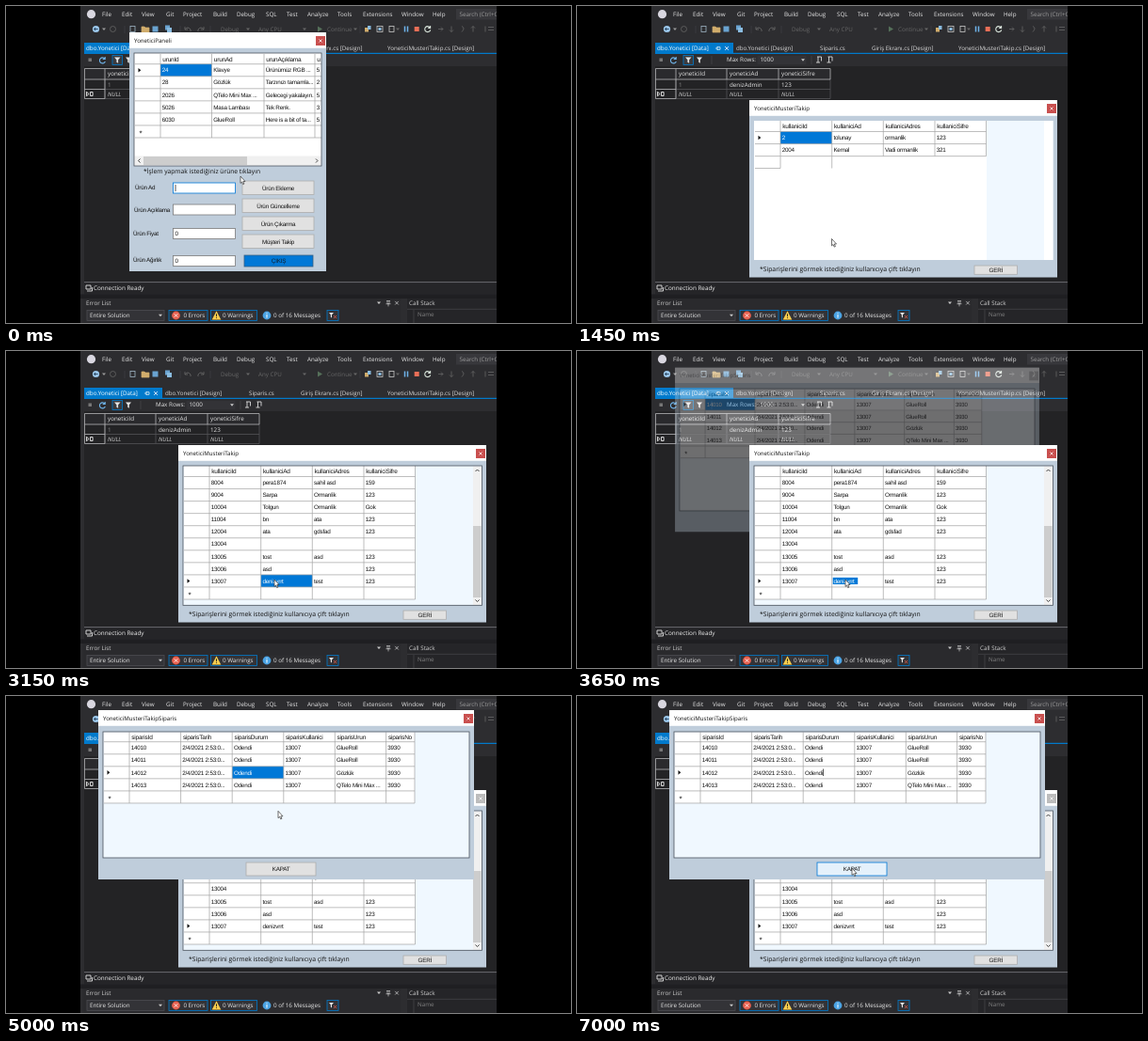
An HTML page that plays this animation: 600x337 px, repeating every 7050 ms.

```html
<!DOCTYPE html>
<html lang="tr">
<head>
<meta charset="utf-8">
<title>Yönetici paneli</title>
<style>
html, body { margin: 0; width: 100%; height: 100%; overflow: hidden; background: #000; }
svg { display: block; width: 100vw; height: 100vh; text-rendering: geometricPrecision; }
text { white-space: pre; }
.ui { font-family: "Open Sans", "Noto Sans", sans-serif; }
.form { font-family: "Liberation Sans", Arial, sans-serif; letter-spacing: -.22px; }
</style>
</head>
<body>
<svg viewBox="0 0 600 337">
  <defs>
    <clipPath id="ide"><rect x="79" width="442" height="337"/></clipPath>
    <clipPath id="panelGrid"><rect x="136" y="50" width="199" height="120"/></clipPath>
    <clipPath id="takipGrid"><rect x="188" y="122" width="317" height="148"/></clipPath>
  </defs>
  <g id="back" clip-path="url(#ide)"></g>
  <g id="wins">
    <g id="panel"></g>
    <g id="siparis"></g>
    <g id="takip"></g>
  </g>
  <path id="cursor" d="M0 0V7.4L1.6 6 2.7 8.6 3.9 8.1 2.8 5.5H5Z" fill="#fff" stroke="#333" stroke-width=".7"/>
</svg>
<script>
const LOOP = 7050;
const BLUE = '#0078d7', BODY = '#bfcddb', AZURE = '#f0f8ff', LINE = '#a3a3a3', EDGE = '#4a525c';
const $ = id => document.getElementById(id);

// Drawing helpers; text is placed by its vertical middle.
const rect = (x, y, w, h, fill, stroke) =>
  `<rect x="${x}" y="${y}" width="${w}" height="${h}" fill="${fill}"` +
  (stroke ? ` stroke="${stroke}" stroke-width=".8"` : '') + '/>';
const path = (d, stroke, w = .7, fill = 'none') =>
  `<path d="${d}" stroke="${stroke}" stroke-width="${w}" fill="${fill}"/>`;
const shape = (d, fill) => `<path d="${d}" fill="${fill}"/>`;
const dot = (x, y, r, fill) => `<circle cx="${x}" cy="${y}" r="${r}" fill="${fill}"/>`;
const text = (cls, x, y, s, fill, size, extra = '') =>
  `<text class="${cls}" x="${x}" y="${y + size * .35}" font-size="${size}" fill="${fill}" ${extra}>${s}</text>`;
const ui = (x, y, s, fill = '#e6e6e6', size = 6.25, extra) => text('ui', x, y, s, fill, size, extra);
const form = (x, y, s, fill = '#111', size = 6.3, extra) => text('form', x, y, s, fill, size, extra);
const cross = (x, y, r, c) => path(`M${x - r} ${y - r}L${x + r} ${y + r}M${x + r} ${y - r}L${x - r} ${y + r}`, c, .8);
const down = (x, y, c = '#999') => shape(`M${x - 2} ${y - 1}h4l-2 2.4z`, c);

function button(b, hot) {
  const [x, y, w, h, label] = b;
  return rect(x, y, w, h, hot ? '#e5f1fb' : '#e1e1e1', hot ? BLUE : '#adadad') +
    form(x + w / 2, y + h / 2 + .2, label, '#111', 6.3, 'text-anchor="middle"');
}

function frame(x, y, w, h, title, active = true) {
  return rect(x, y, w, h, BODY) + rect(x, y, w, 16.8, '#fff') +
    ui(x + 5, y + 8.7, title, active ? '#111' : '#777', 6.15) +
    rect(x + w - 11, y + 4, 10, 10, active ? '#c9504f' : '#bcbcbc') +
    cross(x + w - 6, y + 9, 1.5, '#fff');
}

// Data table: the first column holds the row markers, the last row may be the "new" row.
function table({ xs, y, head, heads, rows, mark, sel, edit }) {
  const pitch = 13.05, left = xs[0], right = xs[xs.length - 1];
  const top = y + head, rowY = r => top + r * pitch, bottom = rowY(rows.length);
  let s = rect(left, y, right - left, bottom - y, '#fff');
  if (sel) {
    const [r, c] = sel;
    s += rect(xs[c + 1], rowY(r), xs[c + 2] - xs[c + 1], pitch, BLUE);
  }
  let d = xs.slice(1).map(x => `M${x} ${y}V${bottom}`).join('');
  for (let r = 0; r <= rows.length; r++) d += `M${left} ${rowY(r)}H${right}`;
  s += path(d, LINE);
  heads.forEach((h, c) => s += form(xs[c + 1] + 2.3, y + head / 2 + .2, h, '#111', 6.5));
  rows.forEach((row, r) => {
    const mid = rowY(r) + pitch / 2;
    if (!row) {
      s += form(left + 4.5, mid + 1.5, '*', '#111', 8);
      return;
    }
    row.forEach((v, c) => {
      const on = sel && sel[0] === r && sel[1] === c;
      const marked = edit && edit[0] === r && edit[1] === c;
      if (marked) s += rect(xs[c + 1] + 1, mid - 3.6, 26.5, 7.2, BLUE);
      s += form(xs[c + 1] + 1.7, mid, v, on || marked ? '#fff' : '#111');
    });
  });
  if (mark >= 0) {
    const m = rowY(mark) + pitch / 2;
    s += shape(`M${left + 3.5} ${m - 2.3}l2.8 2.3l-2.8 2.3z`, '#111');
  }
  return s;
}

function drawBack() {
  const dim = '#666', pale = '#c8c8c8';
  let s = rect(79, 0, 442, 337, '#2d2d30');
  s += dot(90.5, 8.7, 4.6, '#d9d7e0');
  [[102, 'File'], [123, 'Edit'], [144, 'View'], [170, 'Git'], [188, 'Project'], [220, 'Build'], [245, 'Debug'],
   [276, 'SQL'], [298, 'Test'], [320, 'Analyze'], [352, 'Tools'], [379, 'Extensions'], [420, 'Window'], [453, 'Help']]
    .forEach(([x, n]) => s += ui(x, 8.8, n));
  s += rect(478, 3, 46, 11.5, '#38383c') + ui(481.5, 8.8, 'Search (Ctrl+Q)', '#9a9a9a');

  // main toolbar
  s += dot(95.5, 24.5, 3.6, '#9cc8ec') + path('M97.6 24.5h-4l1.6-1.6M93.6 24.5l1.6 1.6', '#24405c', .9) +
    down(104, 24.5) + `<circle cx="113.5" cy="24.5" r="3" fill="none" stroke="${dim}" stroke-width=".8"/>`;
  s += path('M126 21v8M185 21v8M217 21v8M376 21v8', '#414145');
  s += rect(132, 21.5, 5, 6, 'none', '#9fb4c4') + path('M144 28v-6h3l1 1h4v5z', '#d0ac6c', .7, '#d0ac6c') +
    rect(155.5, 21.5, 6, 6, '#6aa3d0') + rect(169, 20.5, 5, 5, '#6aa3d0') + rect(171, 23, 5, 5, '#8abce0');
  s += path('M190 22v3h3M190 25q3-4 6 0v2M210 22v3h-3M210 25q-3-4-6 0v2', dim, .9);
  s += ui(228, 24.6, 'Debug', dim) + down(257, 24.6, dim);
  s += ui(268, 24.6, 'Any CPU', dim) + down(317, 24.6, dim);
  s += shape('M331 21.5l5 3l-5 3z', '#56705a') + ui(341, 24.6, 'Continue', dim) + down(371, 24.6, dim);
  s += rect(381, 23, 4, 4.5, '#d0ac6c') + rect(384, 21, 3.5, 4, '#8abce0') +
    rect(394, 21.5, 6, 6, 'none', pale) + rect(395.5, 23, 3, 3, '#8abce0') + rect(407, 21.5, 5, 6, 'none', pale) + down(416, 24.6, dim);
  s += path('M423.5 21.5v6M426.5 21.5v6', '#6fb4ea', 1.5) + rect(433.7, 22, 5, 5, '#ea6f57') +
    path('M450.2 22.9a3 3 0 1 0 .5 2.4M450.6 21v2.4h-2.4', '#d8e4da', 1.1);
  s += path('M459 24.5h5l-2-2M464 24.5l-2 2M473 21.5v6l-2-2M473 27.5l2-2M484 21.5q4 2 0 6M496 27.5v-6l-2 2M496 21.5l2 2M509 21.5v6M512 22.5h6M512 25.5h6', dim, .8);

  // document tabs
  s += rect(83, 39, 83, 11, '#007acc') + rect(83, 49.8, 438, 1.2, '#007acc');
  s += ui(85, 44.8, 'dbo.Yonetici [Data]', '#fff') + path('M147 45h2M149 43v4M149 43.7h3v2.6h-3', '#fff') + cross(159, 45, 1.9, '#fff');
  [[169, 'dbo.Yonetici [Design]'], [258, 'Siparis.cs'], [313, 'Giriş Ekranı.cs [Design]'], [405, 'YoneticiMusteriTakip.cs [Design]']]
    .forEach(([x, n]) => s += ui(x, 44.8, n, '#dadada', 6.2));

  // data view
  s += rect(83, 64, 438, 230, '#232325');
  s += rect(87.5, 55.5, 3.5, 3.5, '#777') + path('M104.9 56.2a3 3 0 1 0 .4 2.6M105.2 54v2.5h-2.5', '#6fb4ea', 1.1);
  s += rect(113, 52.5, 10.5, 10, '#3a3a3e', '#007acc') + shape('M115 54.5h6.5l-2.4 2.8v3.4l-1.7-1v-2.4z', '#e6e6e6') +
    shape('M127 54.5h6l-2.2 2.8v3.4l-1.6-1v-2.4z', '#e6e6e6') + path('M143 53v9M249 53v9', '#48484c');
  s += ui(159, 57.3, 'Max Rows:') + rect(191.5, 53, 52, 9, '#333337') + ui(194.5, 57.3, '1000') + down(240, 57.3, pale);
  const script = x => path(`M${x} 54h4.5v4.5M${x + 1} 54v6h-2M${x + 1} 60h2`, '#dcdcdc', .9);
  s += script(255) + script(266.5);
  const cols = [83.5, 105, 159, 214, 269];
  s += rect(83, 66.5, 186, 11.5, '#2a2a2d');
  s += path('M105 88.5H269M105 98.5H269' + cols.slice(1).map(x => `M${x} 78V98.5`).join(''), '#59595d') +
    path('M83.5 66.5H269V78H83.5ZM83.5 78V98.5H105V66.5M83.5 88.5H105M159 66.5V78M214 66.5V78', '#b4b4b6', .8);
  ['yoneticiId', 'yoneticiAd', 'yoneticiSifre'].forEach((n, i) => s += ui(cols[i + 1] + 3, 72, n));
  ['1', 'denizAdmin', '123'].forEach((n, i) => s += ui(cols[i + 1] + 3, 83.5, n, i ? '#e6e6e6' : '#888'));
  for (let i = 1; i < 4; i++) s += ui(cols[i] + 3, 93.5, 'NULL', '#cfcfcf', 6.1, 'font-style="italic"');
  s += path('M85.5 91.3l2.6 2.2l-2.6 2.2zM89.5 91.5h2.6v4h-2.6z', '#eee', .9);

  // status line and tool windows
  s += rect(83, 293, 438, 13.5, '#252528') + path('M83 293.6H521', '#7c7c80', .8);
  s += path('M85 297h5v4h-5zM86 303h5.5v-4', '#e0e0e0', .9) + ui(93, 300, 'Connection Ready', '#f0f0f0', 6.35);
  s += rect(79, 306.5, 442, 4.5, '#1f1f22');
  s += rect(82, 311, 337, 26, '#2a2a2d') + ui(85, 315.8, 'Error List', '#cfcfcf') + down(396, 315.5, pale) +
    path('M404 313.5h4M405 313.5v3h2v-3M403.5 316.7h5M406 317v2.4', pale) + cross(415, 315.7, 1.8, pale);
  s += rect(86, 323.5, 82, 11, '#333337', '#4d4d52') + ui(89, 328.8, 'Entire Solution') + down(164, 328.8, pale);
  s += rect(173, 323.5, 41, 11, '#333337', '#007acc') + dot(180.5, 329, 4.4, '#e8604f') + cross(180.5, 329, 1.9, '#fff') + ui(188.4, 328.8, '0 Errors');
  s += rect(217.5, 323.5, 49, 11, '#333337', '#007acc') + shape('M223.5 324.2l4.8 9.2h-9.6z', '#f6ce4e') +
    path('M223.5 327.3v2.6M223.5 330.8v1', '#111', .9) + ui(230, 328.8, '0 Warnings');
  s += rect(270.5, 323.5, 66, 11, '#2d2d30') + dot(277, 329, 4.4, '#4aa3e4') + path('M277 328v3.6M277 326.2v1', '#fff', 1) + ui(284, 328.8, '0 of 16 Messages');
  s += rect(341, 323.5, 12, 11, '#333337', '#007acc') + shape('M343 326h5l-2 2.2v3.4l-1.2-1v-2.4z', '#e6e6e6') + cross(349.5, 330.5, 1.5, '#e8604f');
  s += rect(426, 311, 95, 26, '#252528') + ui(428, 315.8, 'Call Stack', '#cfcfcf') + path('M426 322.3h95M433 323v14', '#48484c') + ui(437, 328.3, 'Name', '#808080');
  return s;
}

const panelButtons = [
  [251, 186, 76, 14.5, 'Ürün Ekleme'], [251, 205, 76, 14.5, 'Ürün Güncelleme'],
  [251, 224, 76, 14.5, 'Ürün Çıkarma'], [251, 243, 76, 14.5, 'Müşteri Takip']
];
const closeButton = [255, 177, 74, 14, 'KAPAT'];
const over = ([x, y, w, h], [px, py]) => px >= x && px <= x + w && py >= y && py <= y + h;

function drawPanel(hot, caret) {
  let s = frame(131, 28, 209, 254, 'YoneticiPaneli') + rect(136, 50, 199, 120, '#fff');
  s += '<g clip-path="url(#panelGrid)">' + table({
    xs: [137, 164, 218.5, 274, 328, 383], y: 51, head: 10.7,
    heads: ['urunId', 'urunAd', 'urunAçıklama', 'u'],
    rows: [
      ['24', 'Klavye', 'Ürünümüz RGB ...', '5'],
      ['28', 'Gözlük', 'Tarzınızı tamamla...', '2'],
      ['2026', 'QTelo Mini Max ...', 'Gelecegi yakalayın.', '5'],
      ['5026', 'Masa Lambası', 'Tek Renk.', '3'],
      ['6030', 'GlueRoll', 'Here is a bit of ta...', '5'], null],
    mark: 0, sel: [0, 0]
  }) + '</g>';
  s += rect(136.5, 159.5, 198, 10, '#f0f0f0') + rect(146, 160, 110, 9, '#cdcdcd') +
    path('M142.5 162.5l-2 2l2 2M329 162.5l2 2l-2 2', '#444', 1) + rect(136, 50, 199, 120, 'none', EDGE);
  s += ui(146, 175.5, '*İşlem yapmak istediğiniz ürüne tıklayın', '#111', 6.7);
  [['Ürün Ad', 137, 192.5, 188], ['Ürün Açıklama', 136, 216.5, 211], ['Ürün Fiyat', 135, 241.5, 236.5], ['Ürün Ağırlık', 135, 269.5, 265.5]]
    .forEach(([n, x, y, top], i) => s += form(x, y, n) + rect(177.5, top, 66, 11, '#fff', i ? '#7a7a7a' : BLUE) +
      (i > 1 ? form(179.5, top + 5.7, '0') : ''));
  if (caret) s += path('M180 190v7', '#111');
  panelButtons.forEach((b, i) => s += button(b, i === hot));
  return s + rect(253, 265, 73, 12, BLUE, '#3a5f80') + form(289.5, 271.2, 'ÇIKIŞ', '#102030', 6.3, 'text-anchor="middle"');
}

const users = [
  ['2', 'tolunay', 'ormanlik', '123'], ['2004', 'Kemal', 'Vadi ormanlik', '321'],
  ['3004', 'asd', 'asd', '123'], ['4004', 'test', 'test', '123'],
  ['6004', 'deneme', 'asd', '123'], ['7004', 'abc', 'test', '123'],
  ['8004', 'pera1874', 'sahil asd', '159'], ['9004', 'Sarpa', 'Ormanlik', '123'],
  ['10004', 'Tolgun', 'Ormanlik', 'Gok'], ['11004', 'bn', 'ata', '123'],
  ['12004', 'ata', 'gdsfad', '123'], ['13004', '', '', ''],
  ['13005', 'tost', 'asd', '123'], ['13006', 'asd', '', '123'],
  ['13007', 'denizvrrt', 'test', '123'], null
];

function drawTakip({ ready, first, picked, editing, active }) {
  let s = frame(183, 100, 327, 188.5, 'YoneticiMusteriTakip', active) + rect(188, 122, 317.5, 148, AZURE);
  const row = (picked ? 14 : 0) - first, col = picked ? 1 : 0;
  const rows = ready ? users.slice(first, first + 11) : users.slice(0, 2);
  if (!ready) s += rect(188, 122, 247, 148, '#fff') + rect(496, 122, 9.5, 148, '#fff') + path('M216 160v12.5H189M270.7 160v12.5', LINE);
  s += '<g clip-path="url(#takipGrid)">' + table({
    xs: [189, 216, 270.7, 325.3, 380, 434.5], y: 122, head: 11.5,
    heads: ['kullaniciId', 'kullaniciAd', 'kullaniciAdres', 'kullaniciSifre'],
    rows, mark: row, sel: row >= 0 && !(picked && (editing || !active)) ? [row, col] : null,
    edit: editing && active ? [row, col] : null
  }) + '</g>';
  if (ready) {
    s += rect(496, 122.5, 9, 147.5, '#f0f0f0') + rect(496, 131 + first * 55 / 6, 8.5, 76, '#cdcdcd') +
      path('M498.5 128l2-2l2 2M498.5 264.5l2 2l2-2', '#444', 1) + rect(188, 122, 317.5, 148.3, 'none', EDGE);
  }
  return s + ui(194, 280, '*Siparişlerini görmek istediğiniz kullanıcıya çift tıklayın', '#111', 6.8) +
    button([422, 276, 45.5, 9.3, 'GERİ']);
}

function drawSiparis({ front, typing, hot }) {
  const order = (id, item) => [id, '2/4/2021 2:53:0...', 'Odendi', '13007', item, '3930'];
  const at = front ? [2, 2] : [0, 0];
  let s = frame(98, 15, 399, 180, 'YoneticiMusteriTakipSiparis', front) + rect(103, 38, 389, 134, AZURE);
  s += table({
    xs: [104, 131, 185.6, 240.2, 294.8, 349.3, 403.6, 434], y: 38.5, head: 10.2,
    heads: ['siparisId', 'siparisTarih', 'siparisDurum', 'siparisKullanici', 'siparisUrun', 'siparisNo'],
    rows: [order('14010', 'GlueRoll'), order('14011', 'GlueRoll'), order('14012', 'Gözlük'), order('14013', 'QTelo Mini Max ...'), null],
    mark: at[0], sel: typing ? null : at
  });
  if (typing) s += path('M261.5 77.5v7.5', '#111');
  return s + rect(103, 38, 389, 134, 'none', EDGE) + button(closeButton, hot);
}

// Pointer path: time, x, y
const route = [
  [0, 249, 181], [50, 249, 181], [450, 270, 246], [750, 270.5, 247.5], [1500, 270.5, 247.5], [1800, 292, 214],
  [2500, 292, 214], [2750, 285, 243], [3800, 285, 243], [4150, 278, 206], [4300, 270, 80], [4450, 270, 80],
  [5000, 289, 122], [5100, 290, 153], [5300, 292, 179], [5450, 292, 179], [5500, 314, 180], [5600, 314, 180],
  [5750, 292, 183], [LOOP, 292, 183]
];
function pointer(t) {
  const i = Math.max(1, route.findIndex(p => p[0] > t));
  const [t0, x0, y0] = route[i - 1], [t1, x1, y1] = route[i];
  const k = (t - t0) / (t1 - t0);
  return [x0 + (x1 - x0) * k, y0 + (y1 - y0) * k];
}

const last = {};
function paint(id, html) {
  if (last[id] !== html) $(id).innerHTML = last[id] = html;
}
const ramp = (t, a, b) => Math.min(1, Math.max(0, (t - a) / (b - a)));

// Windows fade and grow slightly around their centre.
function reveal(id, k, cx, cy) {
  const z = .93 + .07 * (1 - (1 - k) ** 2);
  const g = $(id);
  g.setAttribute('opacity', k);
  g.setAttribute('transform', `translate(${cx * (1 - z)} ${cy * (1 - z)}) scale(${z})`);
}

function render(t) {
  const p = pointer(t), front = t >= 4400;
  paint('panel', drawPanel(panelButtons.findIndex(b => over(b, p)), t < 450 || t >= 950));
  paint('takip', drawTakip({
    ready: t >= 1500, first: t < 2100 ? 0 : t < 2350 ? 3 : 6,
    picked: t >= 3150, editing: t >= 3600, active: !front
  }));
  paint('siparis', drawSiparis({ front, typing: t >= 7000, hot: front && over(closeButton, p) }));
  reveal('panel', 1 - ramp(t, 1250, 1380), 235, 155);
  reveal('takip', ramp(t, 1290, 1440), 346, 194);
  reveal('siparis', ramp(t, 3600, 3750), 297, 105);
  const top = $(front ? 'siparis' : 'takip');
  if ($('wins').lastElementChild !== top) $('wins').append(top);
  $('cursor').setAttribute('transform', `translate(${p[0]} ${p[1]})`);
}

paint('back', drawBack());
const start = performance.now();
function tick() {
  render((performance.now() - start) % LOOP);
  requestAnimationFrame(tick);
}
tick();
</script>
</body>
</html>
```
